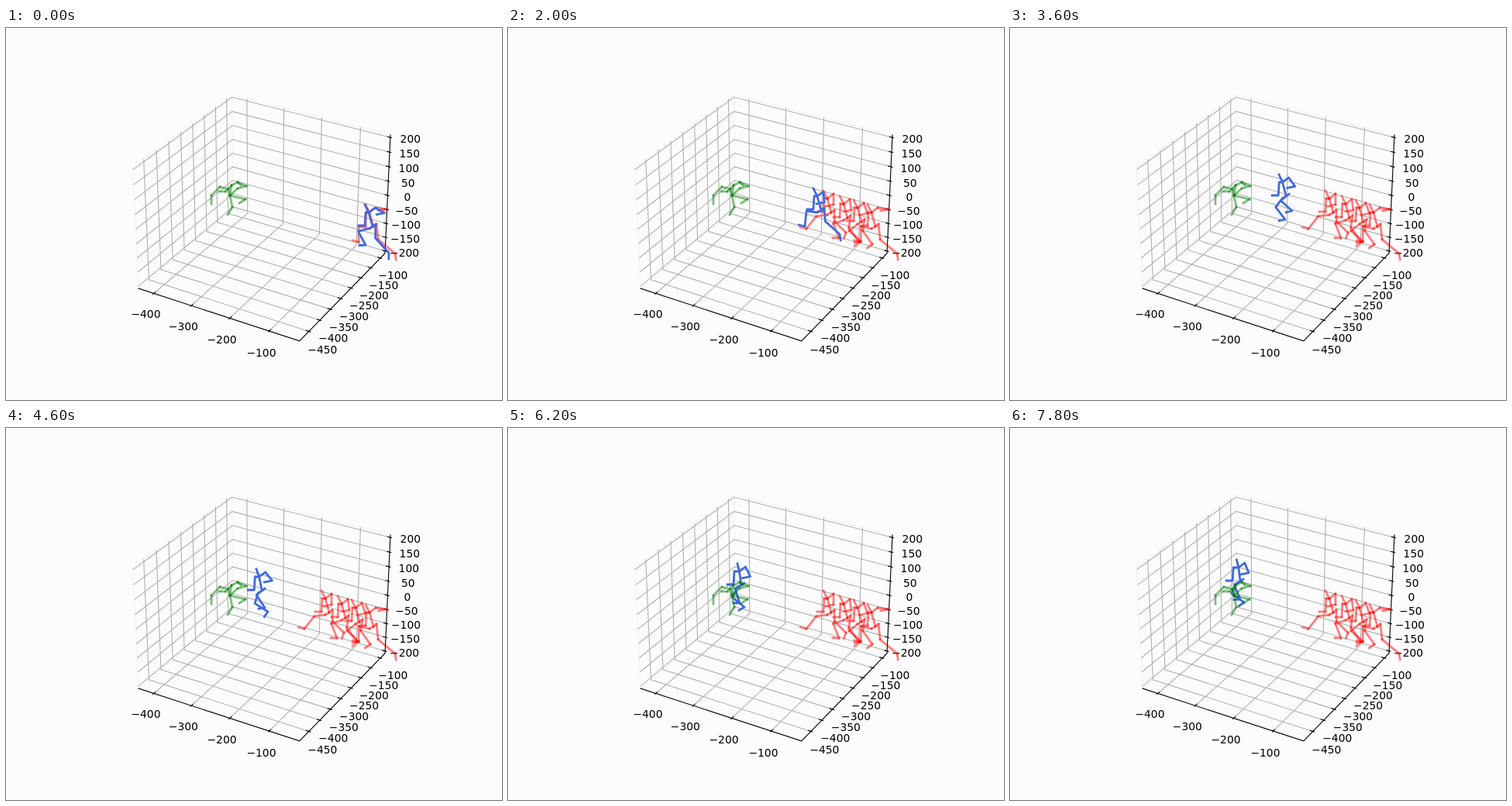
An HTML page for the animation above (8 s loop, 640 by 480 pixels).

```html
<!DOCTYPE html>
<html lang="en">
<head>
<meta charset="utf-8">
<title>Walking figure in 3D axes</title>
<style>
html, body { margin: 0; width: 100%; height: 100%; overflow: hidden; background: #fcfcfc; }
svg { display: block; width: 640px; height: 480px; }
text { font: 13.89px "DejaVu Sans", sans-serif; text-anchor: middle; }
path { fill: none; }
.pane { stroke: #f1f1f1; }
.grid { stroke: #b0b0b0; stroke-width: 1.11; }
.axis { stroke: #000; stroke-width: 1.11; stroke-linecap: square; }
.bone { stroke-width: 2.8; stroke-linecap: square; stroke-linejoin: round; }
.past { stroke: #f00; stroke-opacity: .5; }
.goal { stroke: #008000; stroke-opacity: .5; }
.walker { stroke: #4169e1; }
</style>
</head>
<body>
<svg id="stage" viewBox="0 0 640 480"></svg>
<script>
const STEP = 200, LOOP = 8000;
const stage = document.getElementById('stage');

function add(tag, attrs, parent = stage) {
  const el = document.createElementNS('http://www.w3.org/2000/svg', tag);
  for (const k in attrs) el.setAttribute(k, attrs[k]);
  parent.appendChild(el);
  return el;
}
const group = cls => add('g', { class: cls });
const pathOf = pts => 'M' + pts.map(p => p.map(v => v.toFixed(2)).join(' ')).join('L');

// ---- 3D axes: perspective camera at elevation 30, azimuth -60 ----
const SPAN = 400, PAD = SPAN / 48;
const LOW = [-433, -484, -200];
const MIN = LOW.map(v => v - PAD), MAX = LOW.map(v => v + SPAN + PAD);
const SIZE = [8 / 7, 8 / 7, 6 / 7];

function project(p) {
  const [x, y, z] = p.map((v, i) => ((v - LOW[i]) / SPAN - .5) * SIZE[i]);
  const c = Math.cos(Math.PI / 6);
  const right = c * x + .5 * y;
  const up = -.25 * x + c / 2 * y + c * z;
  const near = c / 2 * x - .75 * y + .5 * z;
  const k = 1997.8 / (10 - near);
  return [333 + right * k, 237.4 - up * k];
}
const draw3d = (pts, cls) => add('path', { class: cls, d: pathOf(pts.map(project)) });

function tick(p, dir) {
  const a = p.slice(), b = p.slice(), out = dir === 1 ? -1 : 1;
  a[dir] -= out * SPAN / 60;
  b[dir] += out * SPAN / 120;
  draw3d([a, b], 'axis');
}

function label(value, p) {
  const [x, y] = project(p);
  add('text', { x, y: Math.round(y + 10.3) }).textContent = String(value).replace('-', '\u2212');
}

function range(from, to, by) {
  const out = [];
  for (let v = from; v <= to; v += by) out.push(v);
  return out;
}

function drawAxes() {
  const [x0, y0, z0] = MIN, [x1, y1, z1] = MAX, off = 34;
  const xs = range(-400, -100, 100), ys = range(-450, -100, 50), zs = range(-200, 200, 50);
  draw3d([[x0, y0, z0], [x0, y1, z0], [x0, y1, z1], [x0, y0, z1], [x0, y0, z0]], 'pane');
  draw3d([[x0, y1, z1], [x1, y1, z1], [x1, y1, z0], [x0, y1, z0]], 'pane');
  for (const x of xs) draw3d([[x, y0, z0], [x, y1, z0], [x, y1, z1]], 'grid');
  for (const y of ys) draw3d([[x1, y, z0], [x0, y, z0], [x0, y, z1]], 'grid');
  for (const z of zs) draw3d([[x0, y0, z], [x0, y1, z], [x1, y1, z]], 'grid');
  draw3d([[x0, y0, z0], [x1, y0, z0], [x1, y1, z0], [x1, y1, z1]], 'axis');
  for (const x of xs) { tick([x, y0, z0], 1); label(x, [x, y0 - off, z0 - off]); }
  for (const y of ys) { tick([x1, y, z0], 0); label(y, [x1 + off, y, z0 - off]); }
  for (const z of zs) { tick([x1, y1, z], 0); label(z, [x1 + off, y1 + off, z]); }
}

// ---- figure: a pose is head, left ankle, right ankle and arm swing ----
const move = ([x, y], dx, dy) => [x + dx, y + dy];
const polar = ([x, y], r, a) => [x + r * Math.cos(a), y + r * Math.sin(a)];

// Two-bone leg with the knee bent forwards; it lengthens when out of reach.
function leg(hip, ankle) {
  const dx = ankle[0] - hip[0], dy = ankle[1] - hip[1], d = Math.hypot(dx, dy);
  const grow = Math.max(1, d / 31.6), thigh = 14 * grow, shin = 20 * grow;
  const cos = (thigh * thigh + d * d - shin * shin) / (2 * thigh * d);
  const bend = Math.acos(Math.max(-1, Math.min(1, cos)));
  const knee = polar(hip, thigh, Math.atan2(dy, dx) + bend);
  // The heel lifts as the foot trails behind.
  const trail = Math.max(-.5, Math.min(1, dx / 18));
  const toe = polar(ankle, 8, Math.PI - .15 - Math.PI / 2 * trail * Math.abs(trail));
  return [hip, knee, ankle, toe];
}

function figure([x, y, lx, ly, rx, ry, swing]) {
  const head = [x, y];
  const lean = Math.min(10, 5 + (x - 296) / 12);
  const neck = move(head, lean / 2, 10), pelvis = move(head, lean, 28);
  const left = move(head, lean - 9, 10), right = move(head, lean / 2 + 8, 4);
  const elbow = polar(right, 14, Math.PI / 2 - swing * Math.PI / 180);
  return [
    [head, neck, pelvis],
    [neck, right, elbow, move(elbow, -10, 2)],
    [neck, left, move(left, -1, 17), move(left, -9, 17)],
    [pelvis, ...leg(move(pelvis, -5, 3), [lx, ly])],
    [pelvis, ...leg(move(pelvis, 4, -3), [rx, ry])]
  ];
}

const key = (t, ...v) => ({ t, v });
const passing = key(600, 446, 222, 455, 275, 470, 279, 20);
const walk = [
  key(0, 463, 228, 464, 280, 494, 290, 62),
  passing,
  key(1200, 426, 217, 425, 271, 445, 278, 18),
  key(2000, 394, 207, 383, 256, 428, 266, 5),
  key(3600, 347, 189, 355, 247, 364, 236, 36),
  key(4600, 323, 182, 338, 237, 334, 232, 39),
  key(6200, 296, 175, 305, 231, 299, 226, 26),
  key(7800, 292.5, 170, 302, 225, 297, 221, 22)
];
const past = [
  key(0, 464, 228, 455, 276, 502, 291, 82),
  passing,
  key(1200, 428, 217, 427, 271, 453, 276, 8),
  key(1800, 407, 210, 385, 259, 436, 264, 0)
];

// Separate bones, so translucent ends overlap at the joints.
function drawBones(list, parent) {
  for (const c of list)
    for (let i = 1; i < c.length; i++)
      add('path', { d: pathOf([c[i - 1], c[i]]) }, parent);
}

// Cubic through the keys, with slopes taken from the neighbours.
function poseAt(t) {
  let i = 0;
  while (i < walk.length - 2 && t >= walk[i + 1].t) i++;
  const a = walk[i], b = walk[i + 1], dt = b.t - a.t;
  const u = (t - a.t) / dt, w = 1 - u;
  const slope = (k, j) => {
    const p = walk[Math.max(0, k - 1)], q = walk[Math.min(walk.length - 1, k + 1)];
    return (q.v[j] - p.v[j]) / (q.t - p.t) * dt;
  };
  return a.v.map((v, j) =>
    v * (1 + 2 * u) * w * w + b.v[j] * (3 - 2 * u) * u * u +
    slope(i, j) * u * w * w - slope(i + 1, j) * u * u * w);
}

drawAxes();

const trail = past.map(k => {
  const el = group('bone past');
  drawBones(figure(k.v), el);
  return { t: k.t, el };
});
const walker = add('path', { class: 'bone walker' });

// Crouching figure that stays in place.
const seat = [289, 216], chest = [291, 203], neck = [299, 199];
drawBones([
  [seat, chest, neck, [303, 203]],
  [seat, [287, 208], [276, 205], [265, 216], [265, 227]],
  [chest, [283, 211], [275, 211]],
  [neck, [310, 204], [299, 207], seat],
  [seat, [292, 231], [286, 241]],
  [seat, [309, 221], [301, 226]]
], group('bone goal'));

function render(ms) {
  const t = Math.floor(ms % LOOP / STEP) * STEP;
  for (const p of trail) p.el.setAttribute('visibility', t >= p.t ? 'visible' : 'hidden');
  walker.setAttribute('d', figure(poseAt(t)).map(pathOf).join(''));
}

const began = performance.now();
function frame() {
  render(performance.now() - began);
  requestAnimationFrame(frame);
}
frame();
</script>
</body>
</html>
```
